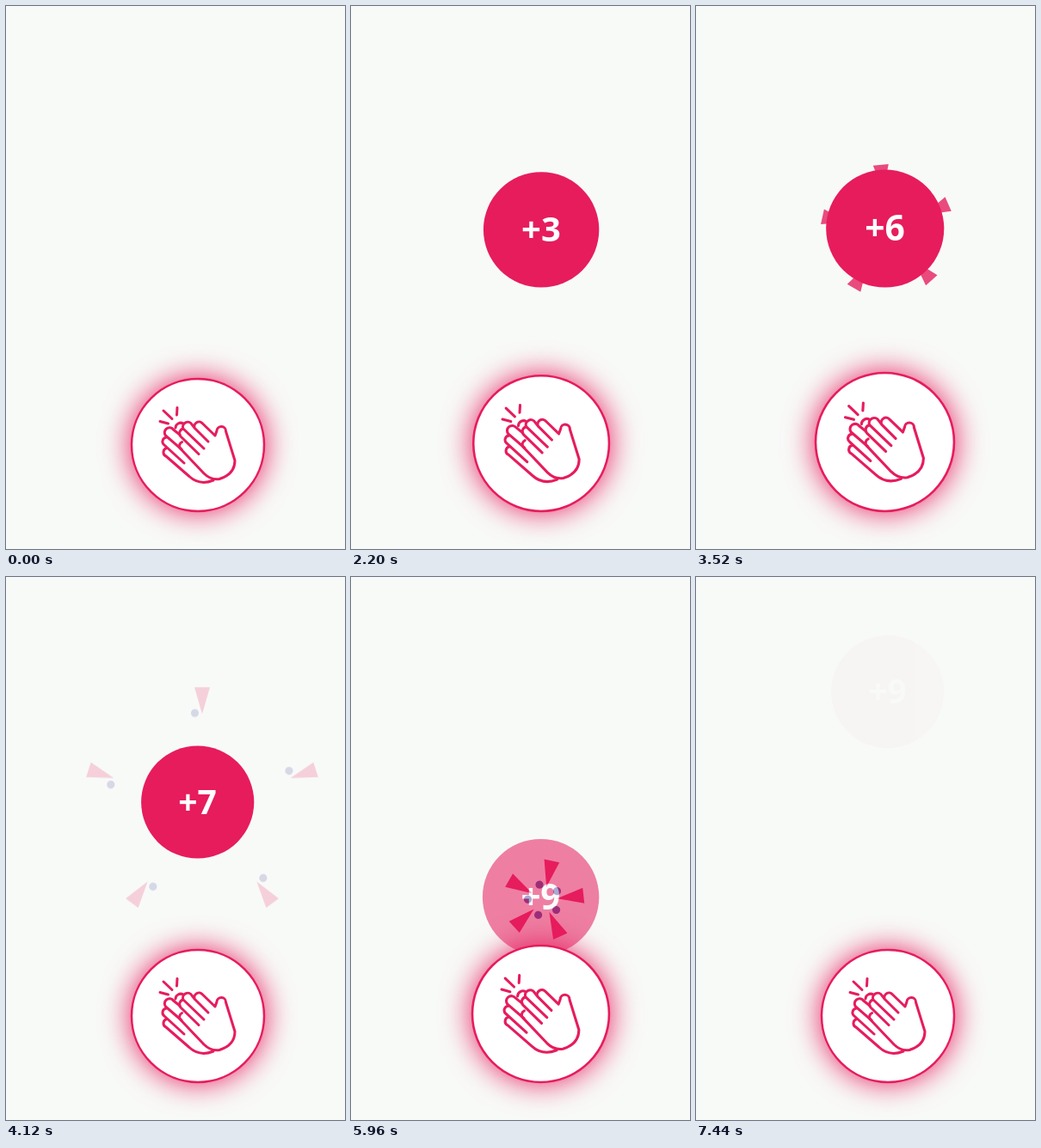
Recreate the animation shown at these times as an HTML page. Size 394x632 px, loop 7.48 s.

```html
<!DOCTYPE html>
<html lang="en">
<head>
<meta charset="utf-8">
<title>Clap button</title>
<style>
  html, body { margin: 0; width: 100%; height: 100%; overflow: hidden; background: #f8faf8; }
  svg { display: block; width: 394px; height: 632px; }
  .accent { fill: #e61c5d; }
  .dot { fill: #44449c; }
  .glow { fill: #e61c5d; filter: blur(17px); }
  .face { fill: #fff; stroke: #e61c5d; stroke-width: 2.5; }
  .icon { fill: none; stroke: #e61c5d; stroke-width: 3; stroke-linecap: round; stroke-linejoin: round; }
  text { font: 700 39px "Open Sans", "Noto Sans", sans-serif; fill: #fff; text-anchor: middle; }
</style>
</head>
<body>
<svg viewBox="0 0 394 632">
  <g id="particles"></g>
  <g id="bubble">
    <circle class="accent" cx="222.7" cy="262" r="65.6"/>
    <text id="count" x="222.5" y="275.5"></text>
  </g>
  <g id="button">
    <circle class="glow" cx="223" cy="511" r="78"/>
    <circle class="face" cx="223" cy="511" r="77"/>
    <path class="icon" d="M179 483.5L188.500 486M183 471L193 480.500M199 467.500L198.500 476"/>
    <path class="icon" d="M197 491A6 6 0 0 1 206 486
      M202 499L194.500 493A5 5 0 0 0 185.500 500L204 516
      M186.500 502A5 5 0 0 0 184 511L207 532
      M187 514.500A5 5 0 0 0 186 524L213 547.500Q225 558.500 241 552"/>
    <path class="icon" d="M243 500L228.500 486A5.300 5.300 0 0 0 219.500 491.500L235 507
      M219.500 491.500L216 487A5.600 5.600 0 0 0 206 492L230 515
      M206 492A5.500 5.500 0 0 0 203 501L224 521.500
      M204.500 507.500A5 5 0 0 0 203 515.500L230 544Q238 552 248 550.500Q266 545 266 529L255.500 495A5 5 0 0 0 245 494.500L243 500"/>
  </g>
</svg>
<script>
const LOOP = 7480;
const HOLD_START = 1310, HOLD_STEP = 404, LAST_CLICK = 5860;
const FADE_STARTS = [5260, 7020], FADE_TIME = 460;
const burstAngles = [32, 28, 22, 6, 69, 48.3, 54, 36, 65.6];
const clicks = burstAngles.map((_, i) => i < 8 ? HOLD_START + HOLD_STEP * i : LAST_CLICK);

const byId = id => document.getElementById(id);
const particles = byId("particles"), bubble = byId("bubble");
const button = byId("button"), count = byId("count");

const clamp = x => Math.min(1, Math.max(0, x));
const smooth = x => (x = clamp(x), x * x * (3 - 2 * x));
const scaleFrom = (x, y, s) => `translate(${x} ${y}) scale(${s}) translate(${-x} ${-y})`;

// One spoke points along +x: an inward-facing triangle and a dot beside its tip.
const spokes = [0, 1, 2, 3, 4].map(() => {
  const spoke = document.createElementNS("http://www.w3.org/2000/svg", "g");
  spoke.innerHTML = '<path class="accent" d="M-31 0L0-9V9Z"/><circle class="dot" cx="-30" cy="-8.5" r="4.6"/>';
  return particles.appendChild(spoke);
});

function draw(time) {
  const index = clicks.filter(c => c <= time).length - 1;
  const started = index >= 0;
  bubble.style.display = particles.style.display = started ? "" : "none";
  const age = started ? time - clicks[index] : Infinity;
  const scale = age < 330 ? 1 + 0.048 * Math.sin(Math.PI * age / 330) ** 2 : 1;
  button.setAttribute("transform", scaleFrom(301, 589, scale));
  if (!started) return;

  const second = index === 8;
  const rise = smooth((time - (second ? LAST_CLICK : HOLD_START)) / 190);
  const fade = smooth((time - FADE_STARTS[+second]) / FADE_TIME);
  const shift = 249 * (1 - rise) - 131 * fade;
  bubble.setAttribute("transform", `translate(0 ${shift}) ${scaleFrom(288.3, 327.5, scale)}`);
  bubble.setAttribute("opacity", rise * (1 - fade));
  count.textContent = "+" + (index + 1);

  const reach = 31 + 111 * smooth(age / 430);
  const offset = 60.3 * scale * scale;
  particles.setAttribute("transform", `translate(${288.3 - offset} ${327.5 - offset + shift})`);
  particles.setAttribute("opacity", clamp(1 - (age - 120) / 330));
  spokes.forEach((spoke, i) =>
    spoke.setAttribute("transform", `rotate(${burstAngles[index] + 72 * i}) translate(${reach} 0)`));
}

const origin = performance.now();
function tick() {
  draw((performance.now() - origin) % LOOP);
  requestAnimationFrame(tick);
}
tick();
</script>
</body>
</html>
```
